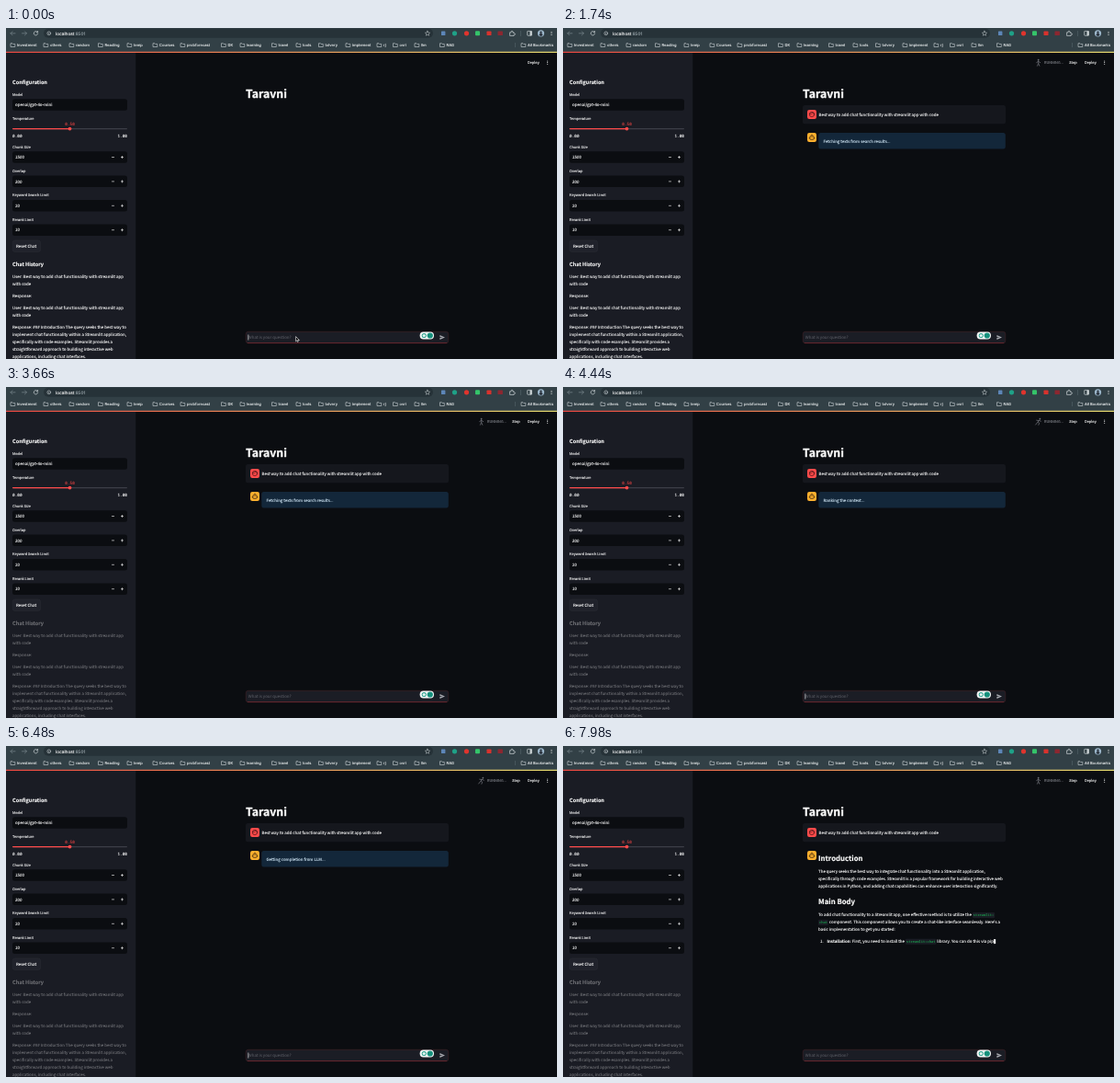
An HTML page with a canvas that plays this animation: 600x360 px, repeating every 8000 ms.

```html
<!DOCTYPE html>
<html lang="en">
<head>
<meta charset="utf-8">
<title>Chat app</title>
<style>
html, body { margin: 0; width: 100%; height: 100%; overflow: hidden; background: #0b0d11; }
canvas { display: block; width: 600px; height: 360px; }
</style>
</head>
<body>
<canvas id="stage"></canvas>
<script>
const canvas = document.getElementById('stage');
const ctx = canvas.getContext('2d');
const ratio = window.devicePixelRatio || 1;
canvas.width = 600 * ratio;
canvas.height = 360 * ratio;

const LOOP = 8000;
const PASTE = 540, SUBMIT = 1140, ASK = 1260, FETCH = 1440;
const RANK = 4380, COMPLETE = 5820, STREAM = 6720, STREAM_END = 7960;

const SANS = '"Noto Sans CJK JP", "Noto Sans CJK SC", "Noto Sans CJK", "Open Sans", sans-serif';
const UI = 'Inter, Roboto, sans-serif';
const MONO = '"Noto Sans Mono", "DejaVu Sans Mono", monospace';
const BODY = 4.46, LABEL = 3.9;
const PAGE = '#0b0d11', SIDE = '#1a1c24', WHITE = '#fafafa', RED = '#ff4b4b', DIM = '#6c6e75';
const QUESTION = 'Best way to add chat functionality with streamlit app with code';

const clamp = v => Math.max(0, Math.min(1, v));

// Text is set ten times larger and scaled down to keep fractional advances;
// an invisible turn switches off hinting and a hairline stroke adds weight.
function text(s, x, y, { size = BODY, color = WHITE, font = SANS, weight = 400, align = 'left' } = {}) {
  ctx.save();
  ctx.translate(x, y);
  ctx.rotate(.0003);
  ctx.scale(.1, .1);
  ctx.textRendering = 'geometricPrecision';
  ctx.font = `${weight} ${size * 10}px ${font}`;
  ctx.textAlign = align;
  ctx.fillStyle = ctx.strokeStyle = color;
  ctx.lineWidth = size * .25;
  ctx.lineJoin = 'round';
  ctx.fillText(s, 0, 0);
  ctx.strokeText(s, 0, 0);
  const width = ctx.measureText(s).width / 10;
  ctx.restore();
  return width;
}

function rect(x, y, w, h, color, radius = 0, border, lineWidth = .4) {
  ctx.beginPath();
  ctx.roundRect(x, y, w, h, radius);
  if (color) { ctx.fillStyle = color; ctx.fill(); }
  if (border) { ctx.strokeStyle = border; ctx.lineWidth = lineWidth; ctx.stroke(); }
}

function dot(x, y, r, color) {
  ctx.beginPath();
  ctx.arc(x, y, r, 0, 7);
  ctx.fillStyle = color;
  ctx.fill();
}

function path(d, x, y, { stroke, fill, width = .7 } = {}) {
  const p = new Path2D(d);
  ctx.save();
  ctx.translate(x, y);
  ctx.lineWidth = width;
  ctx.lineCap = ctx.lineJoin = 'round';
  if (fill) { ctx.fillStyle = fill; ctx.fill(p); }
  if (stroke) { ctx.strokeStyle = stroke; ctx.stroke(p); }
  ctx.restore();
}

function menuDots(x, y) {
  for (const dy of [-1.6, 0, 1.6]) dot(x, y + dy, .5, WHITE);
}

const bookmarks = [
  ['Investment', 12], ['others', 48], ['random', 76], ['Reading', 107.5], ['temp', 139],
  ['Courses', 167], ['probforecast', 197], ['DK', 241.5], ['learning', 262], ['travel', 296.5],
  ['tools', 323], ['tolvery', 347.5], ['implement', 377], ['rj', 411], ['ovri', 428.5],
  ['llm', 452], ['RAG', 479.5], ['All Bookmarks', 568]
];

function browserBar() {
  const icon = '#cdd4d7', faint = '#77868c', line = '#5b6a70';
  rect(0, 0, 600, 26, '#324046');
  rect(41, .8, 424, 10, '#263238', 5);
  path('M5,0H0M2,-2L0,0L2,2', 5, 5.8, { stroke: faint });
  path('M0,0H5M3,-2L5,0L3,2', 17.5, 5.8, { stroke: faint });
  path('M1.6,-1.6A2.2,2.2 0 1 0 2.2,.3M2.1,-2.4V-1H.7', 32.5, 5.8, { stroke: icon });
  path('M1.9,0A1.9,1.9 0 1 1 -1.9,0A1.9,1.9 0 1 1 1.9,0M0,-.2V.8', 46.8, 5.8, { stroke: icon, width: .6 });
  const host = text('localhost', 54, 7.5, { size: 4.75, font: UI });
  text(':8501', 54 + host, 7.5, { size: 4.75, font: UI, color: '#98a4a9' });
  path('M0,-2.6L.8,-.8L2.6,-.6L1.2,.6L1.6,2.4L0,1.5L-1.6,2.4L-1.2,.6L-2.6,-.6L-.8,-.8Z', 459, 5.8,
    { stroke: icon, width: .5 });
  rect(474, 3.5, 4.4, 4.6, '#5d86b8', .5);
  dot(488.5, 5.8, 2.6, '#1fa187');
  dot(501.5, 5.8, 2.6, '#e0342d');
  rect(511, 3.3, 5, 5, '#35c46a', 1);
  rect(523.5, 3.5, 5, 4.6, '#d8322d', .7);
  rect(535.5, 3.5, 5.4, 4.6, '#8d2730', .5);
  path('M-2,-1H-.8A1,1 0 1 1 .8,-1H2V.2A.9,.9 0 1 1 2,1.6V2.6H-2Z', 551, 5.8, { stroke: icon });
  rect(560.5, 3, .5, 6, line);
  rect(567.7, 3.4, 4.8, 4.8, null, .5, icon, .7);
  rect(570.5, 3.4, 2, 4.8, icon);
  dot(582.5, 5.8, 3.6, '#9db8cc');
  dot(582.5, 4.7, 1.2, '#2c3540');
  rect(580.7, 6, 3.6, 2.8, '#2c3540', 1.2);
  menuDots(594, 5.8);
  for (const [name, x] of bookmarks) {
    path('M0,0H1.6L2.2,.7H4.4V3.8H0Z', x - 6.6, 16.7, { stroke: icon, width: .6 });
    text(name, x, 20.2, { size: 4.15, font: UI, color: '#eef1f2' });
  }
  rect(554, 16, .5, 5, line);
  const glow = ctx.createLinearGradient(0, 0, 600, 0);
  glow.addColorStop(0, '#e8453f');
  glow.addColorStop(1, '#e0d66c');
  rect(0, 25.8, 600, 1.3, glow);
}

function field(label, value, top, stepper = true) {
  text(label, 7, top - 3.6, { size: LABEL });
  rect(7, top, 125, 12.5, PAGE, 2.5);
  text(value, 10, top + 8);
  if (!stepper) return;
  path('M-1.1,0H1.1', 116.5, top + 6.3, { stroke: WHITE, width: .6 });
  path('M-1.1,0H1.1M0,-1.1V1.1', 126.5, top + 6.3, { stroke: WHITE, width: .6 });
}

const history = [
  [271.8, 'User: Best way to add chat functionality with streamlit app'], [279.8, 'with code'],
  [292.8, 'Response:'],
  [305.6, 'User: Best way to add chat functionality with streamlit app'], [313.6, 'with code'],
  [326.7, 'Response: ### Introduction The query seeks the best way to'],
  [334.7, 'implement chat functionality within a Streamlit application,'],
  [342.7, 'specifically with code examples. Streamlit provides a'],
  [350.7, 'straightforward approach to building interactive web'],
  [358.7, 'applications, including chat interfaces.']
];

function sidebar(t) {
  const heading = { size: 5.58, weight: 700 };
  const mono = { size: 4.4, font: MONO };
  rect(0, 27, 141.3, 333, SIDE);
  text('Configuration', 7, 61.4, heading);
  field('Model', 'openai/gpt-4o-mini', 77.2, false);
  text('Temperature', 7, 100, { size: LABEL });
  text('0.50', 69.5, 106.4, { ...mono, color: '#d04040', align: 'center' });
  rect(7, 108.9, 125, 1.3, '#3c3e47', .6);
  rect(7, 108.9, 62.5, 1.3, RED, .6);
  dot(69.5, 109.6, 1.9, RED);
  text('0.00', 7, 118.6, mono);
  text('1.00', 132, 118.6, { ...mono, align: 'right' });
  field('Chunk Size', '1500', 134.2);
  field('Overlap', '300', 160.6);
  field('Keyword Search Limit', '20', 187);
  field('Rerank Limit', '10', 213.4);
  rect(7.2, 231, 30.4, 12.4, '#20222b', 2.5, '#31333c');
  text('Reset Chat', 11, 239);

  const fade = clamp((t - 1500) / 1000);
  ctx.globalAlpha = 1 - .67 * fade * fade;
  text('Chat History', 7, 259.3, heading);
  for (const [y, line] of history) text(line, 7, y);
  ctx.globalAlpha = 1;
}

const poses = [
  'M1.6,-2L-.2,.2L1.4,1.4L.6,3.4M-.2,.2L-2.6,3.2M1.2,-1.4L3,-.6M1,-1.2L-1.6,-1.6',
  'M0,-2V.8L1.2,3.4M0,.8L-1.2,3.4M0,-1.6L2,-.2M0,-1.6L-2,-.2',
  'M.6,-1.8L-1,.6L1.6,.8M.6,-1.4L2.4,.2M-3,2.2H3M-2.4,3.4H2.4M-2.6,-2.4L2.6,2'
];
const heads = [[2.1, -3.2], [0, -3.2], [.9, -3]];

function toolbar(t) {
  text('Deploy', 568, 39, { size: LABEL });
  menuDots(589.7, 37.6);
  if (t < SUBMIT) return;
  const pose = Math.floor(t / 360) % 3;
  const sway = .35 * Math.sin(t / 60 * Math.PI / 2);
  const [hx, hy] = heads[pose];
  path(poses[pose], 517.3 + sway, 37.8, { stroke: DIM, width: .8 });
  dot(517.3 + sway + hx, 37.8 + hy, .9, DIM);
  text('RUNNING...', 524, 39, { size: LABEL, color: '#7d7f86' });
  text('Stop', 551.3, 39, { size: LABEL });
}

function userAvatar() {
  const ink = '#4a1518';
  rect(266, 89, 10, 10, RED, 2.2);
  path('M2.7,0A2.7,2.7 0 1 1 -2.7,0A2.7,2.7 0 1 1 2.7,0M-2.4,-.6Q.4,-.4 .8,-2.2Q1.2,-.6 2.5,-.7', 271, 94,
    { stroke: ink });
  dot(270, 94.6, .45, ink);
  dot(272, 94.6, .45, ink);
}

function botAvatar() {
  const ink = '#4a3210';
  rect(266, 114, 10, 10, '#ffb02e', 2.2);
  rect(268.8, 117.4, 4.4, 4, null, 1, ink, .8);
  path('M0,0V-1M-3,3H-2.4M2.4,3H3', 271, 116.8, { stroke: ink, width: .8 });
  dot(270, 119, .5, ink);
  dot(272, 119, .5, ink);
}

const plain = {}, bold = { weight: 700 }, big = { size: 7.8, weight: 700 };
const code = { size: 3.75, font: MONO, color: '#1a9a4c', boxed: true };
const answer = [
  [278, 124.8, ['Introduction', big]],
  [278, 138.1, ['The query seeks the best way to integrate chat functionality into a Streamlit application,', plain]],
  [278, 146.1, ['specifically through code examples. Streamlit is a popular framework for building interactive web', plain]],
  [278, 154.1, ['applications in Python, and adding chat capabilities can enhance user interaction significantly.', plain]],
  [278, 172.2, ['Main Body', big]],
  [278, 185.4, ['To add chat functionality to a Streamlit app, one effective method is to utilize the ', plain], ['streamlit-', code]],
  [278, 193.4, ['chat', code], [" component. This component allows you to create a chat-like interface seamlessly. Here's a", plain]],
  [278, 201.4, ['basic implementation to get you started:', plain]],
  [280, 214.1, ['1.', plain]],
  [287.5, 214.1, ['Installation', bold], [': First, you need to install the ', plain], ['streamlit-chat', code],
    [' library. You can do this via pip', plain]]
];
const answerLength = answer.flatMap(line => line.slice(2)).reduce((n, [s]) => n + s.length, 0);

function streamAnswer(t) {
  let left = Math.ceil(answerLength * clamp((t - STREAM) / (STREAM_END - STREAM)));
  let endX = 278, endY = 124;
  for (const [startX, y, ...runs] of answer) {
    let x = startX;
    for (const [s, style] of runs) {
      if (left <= 0) break;
      const part = s.slice(0, left);
      left -= part.length;
      if (style.boxed) {
        rect(x, y - 4.4, part.length * 2.25 + 1.8, 6, SIDE, 1);
        x += .9;
      }
      x += text(part, x, y, style) + (style.boxed ? .9 : 0);
      endX = x;
      endY = y;
    }
  }
  rect(endX, endY - 4, 2.2, 5, WHITE);
}

function conversation(t) {
  text('Taravni', 261, 76, { size: 12.28, weight: 700 });
  if (t >= ASK) {
    rect(261, 84, 221, 20.2, '#15171d', 2.5);
    userAvatar();
    text(QUESTION, 278.5, 95.8);
  }
  if (t < FETCH) return;
  botAvatar();
  if (t >= STREAM) return streamAnswer(t);
  rect(278.3, 114, 203.5, 17.6, '#13273a', 2.5);
  const status = t < RANK ? 'Fetching texts from search results...'
    : t < COMPLETE ? 'Ranking the context...' : 'Getting completion from LLM...';
  text(status, 283.5, 124.7, { color: '#d3e9f8' });
}

function chatInput(t) {
  const filled = t >= PASTE && t < SUBMIT;
  const x = 263.8, base = 338.2;
  rect(261.2, 330.3, 220.6, 12.4, '#1b1d25', 2.5, '#5a262d', .4);
  path('M2,0H218.6', 261.2, 342.6, { stroke: '#a1343a', width: .5 });
  let caretX = x;
  if (filled) {
    caretX += text(QUESTION, x, base);
    const before = 'Best way to add chat functionality with ';
    ctx.font = `${BODY * 10}px ${SANS}`;
    const lead = ctx.measureText(before).width / 10;
    const word = ctx.measureText('streamlit').width / 10;
    rect(x + lead, 339.4, word, .7, '#d9626a');
  } else {
    text('What is your question?', x, base, { color: '#50525a' });
  }
  if ((t + 90) % 1060 < 530) rect(caretX - .2, 333.6, .6, 5.8, WHITE);

  rect(450.6, 330.6, 15.4, 7.8, '#f2f5f5', 3.9);
  dot(455.2, 334.5, 2.5, filled ? '#3f8f88' : '#27a08c');
  dot(455.2, 334.5, 1.6, filled ? '#a9d3cd' : '#e4f4f1');
  dot(461.8, 334.5, 3.1, filled ? '#d8343f' : '#15907c');
  if (filled) text('1', 461.8, 336, { size: 3.8, font: UI, color: '#fff', align: 'center' });
  path('M-2.6,-2.4L3,0L-2.6,2.4V.6L.8,0L-2.6,-.6Z', 475, 336.5, { fill: filled ? WHITE : '#a7a9af' });
}

function pointer(t) {
  if (t >= SUBMIT + 60) return;
  const move = clamp((t - 120) / 720);
  path('M0,0V4.8L1.1,3.8L1.9,5.5L2.7,5.1L1.9,3.5H3.4Z', 315.6 - 2.6 * move * move * (3 - 2 * move), 336,
    { fill: '#000', stroke: '#fff', width: .6 });
}

function frame(now) {
  const t = now % LOOP;
  ctx.setTransform(ratio, 0, 0, ratio, 0, 0);
  rect(0, 0, 600, 360, PAGE);
  sidebar(t);
  browserBar();
  toolbar(t);
  conversation(t);
  chatInput(t);
  pointer(t);
  requestAnimationFrame(() => frame(performance.now()));
}
frame(performance.now());
</script>
</body>
</html>
```
